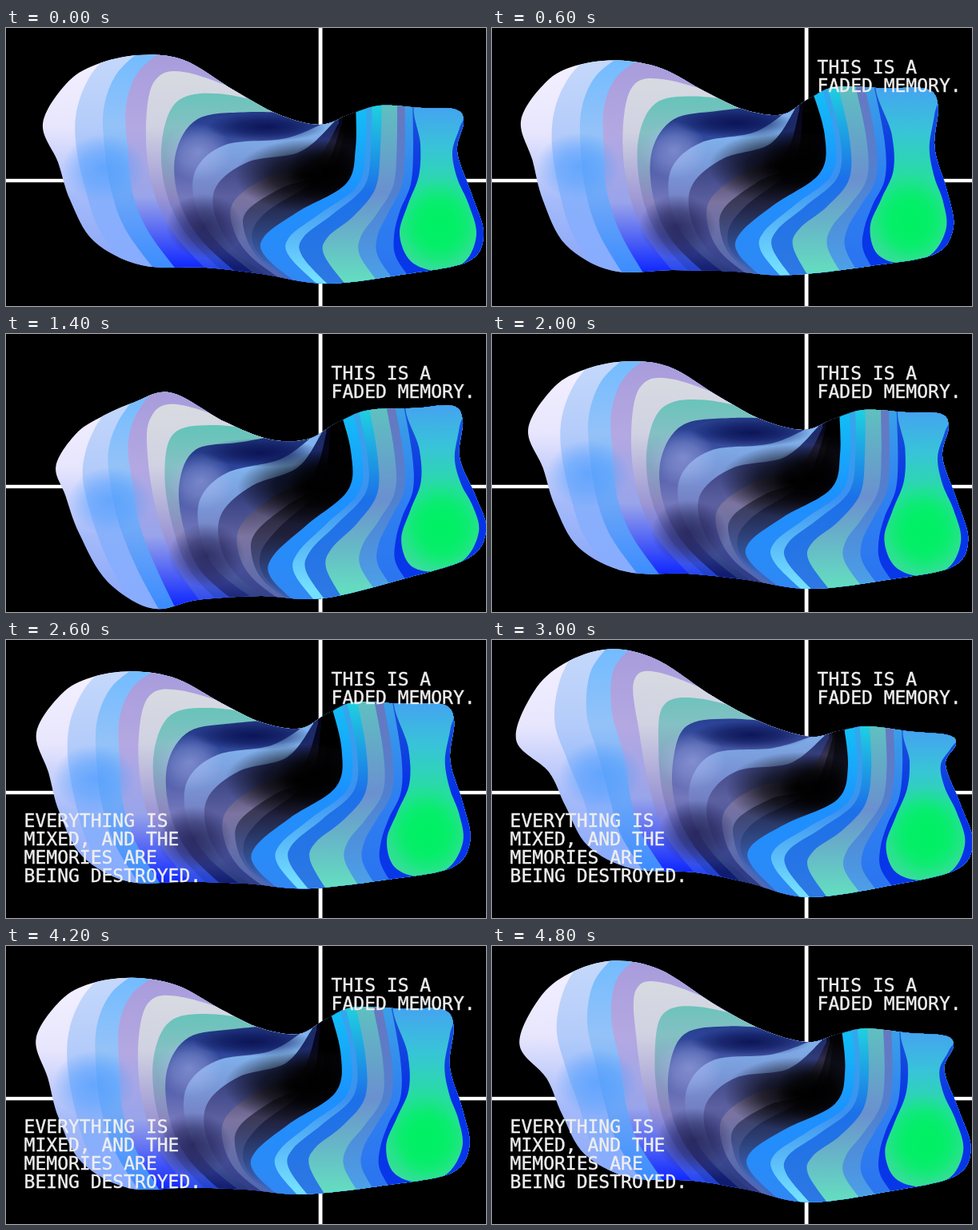
Recreate the animation shown at these times as an HTML page with a canvas. Size 600 by 348 pixels, loop 5 s.

```html
<!DOCTYPE html>
<html lang="en">
<head>
<meta charset="utf-8">
<title>Faded memory</title>
<style>
  html, body { margin: 0; width: 600px; height: 348px; overflow: hidden; background: #000; }
  canvas, svg { position: absolute; left: 0; top: 0; display: block; }
  text {
    font: 23px "DejaVu Sans Mono", "Noto Sans Mono", monospace;
    fill: #eee; stroke: #eee; stroke-width: .4px; white-space: pre;
  }
</style>
</head>
<body>
<canvas id="stage" width="600" height="348"></canvas>
<svg width="600" height="348" viewBox="0 0 600 348">
  <g id="first">
    <text x="406.6" y="57">THIS IS A</text>
    <text x="406.6" y="80">FADED MEMORY.</text>
  </g>
  <g id="second">
    <text x="22.6" y="234">EVERYTHING IS</text>
    <text x="22.6" y="257">MIXED, AND THE</text>
    <text x="22.6" y="280">MEMORIES ARE</text>
    <text x="22.6" y="303">BEING DESTROYED.</text>
  </g>
</svg>
<script>
const ctx = document.getElementById('stage').getContext('2d');
const first = document.getElementById('first');
const second = document.getElementById('second');
const STEP = 200, LOOP = 5000, CYCLE = 9.5;

const points = s => s.trim().split(/\s+/).map(p => p.split(',').map(Number));
const lerp = (a, b, k) => a + (b - a) * k;

// Resting shape, clockwise from the left tip.
const outline = points(`46,120 75,70 112,46 165,34 222,40 285,78 340,108 392,121 430,108 468,97
  520,100 562,102 572,118 564,155 582,208 597,258 578,292 500,308 400,320 320,308 250,300
  170,297 110,267 80,215 65,168`);
const drop = points(`513,92 518,145 516,185 502,222 492,258 506,292 540,304 574,292 588,258
  578,220 564,188 558,155 567,125 577,92`);

// Main seams between the bands, top to bottom.
const seams = [
  '132,28 104,62 88,105 88,150 100,205 118,255 160,312',
  '205,22 166,54 150,98 152,150 158,205 178,255 222,314',
  '330,94 228,56 186,66 175,125 182,195 208,255 262,314',
  '404,116 350,138 275,146 237,178 238,225 268,272 330,322',
  '420,120 395,180 345,200 302,228 298,255 318,290 372,328',
  '437,90 437,150 425,195 365,230 322,262 326,288 378,330',
  '470,86 468,150 462,200 435,235 402,262 398,285 430,328',
  '508,88 509,150 506,195 492,230 485,260 488,288 512,322'
].map(points);

// Handles: place at rest, then the pull towards the wide, low and tall poses.
const handles = [
  '46,120 -10,-5 17,45 -16,5',
  '150,36 -8,5 -2,57 -20,-23',
  '222,40 -10,11 -15,34 -17,-16',
  '300,86 -20,0 -10,32 -10,-8',
  '400,120 -32,-14 -16,9 5,1',
  '468,97 -40,-24 -16,-2 2,11',
  '566,104 -18,-26 -4,-13 9,17',
  '564,155 -11,-5 3,0 3,1',
  '597,258 -21,-8 3,-13 4,-5',
  '400,320 -30,-11 -5,11 -5,2',
  '250,300 -25,3 -10,33 5,-9',
  '170,297 -20,7 13,47 5,-11',
  '65,168 -15,-3 9,34 6,-3',
  '207,128 -12,-2 1,32 11,-5',
  '437,150 -22,-18 -6,-2 8,8',
  '325,258 -12,-5 13,15 2,-4'
].map(points);

const basis = (x, y) => [
  ...handles.map(([[hx, hy]]) => {
    const r = ((x - hx) ** 2 + (y - hy) ** 2) / 1e4;
    return r ? r * Math.log(r) : 0;
  }), 1, x / 100, y / 100];

function solve(rows) {
  const n = rows.length;
  for (let c = 0; c < n; c++) {
    let p = c;
    for (let r = c; r < n; r++) if (Math.abs(rows[r][c]) > Math.abs(rows[p][c])) p = r;
    [rows[c], rows[p]] = [rows[p], rows[c]];
    for (let r = 0; r < n; r++) {
      if (r === c) continue;
      const f = rows[r][c] / rows[c][c];
      for (let k = c; k <= n; k++) rows[r][k] -= f * rows[c][k];
    }
  }
  return rows.map((row, i) => row[n] / row[i]);
}

// Thin-plate coefficients of one pose along one axis.
function fit(pose, axis) {
  const rows = handles.map(h => [...basis(...h[0]), h[pose][axis]]);
  for (const side of [() => 1, h => h[0][0] / 100, h => h[0][1] / 100])
    rows.push([...handles.map(side), 0, 0, 0, 0]);
  return solve(rows);
}
const poses = [1, 2, 3].map(p => [fit(p, 0), fit(p, 1)]);

function makeWarp(weights) {
  const [cx, cy] = [0, 1].map(axis => poses[0][axis].map((_, i) =>
    weights.reduce((sum, w, p) => sum + w * poses[p][axis][i], 0)));
  return ([x, y]) => {
    const b = basis(x, y);
    const pull = c => b.reduce((sum, v, i) => sum + v * c[i], 0);
    return [x + pull(cx), y + pull(cy)];
  };
}

// The shape swells wide, tall, low, tall in every cycle.
const bump = (t, mid, reach) =>
  Math.abs(t - mid) < reach ? Math.cos((t - mid) / reach * Math.PI / 2) ** 2 : 0;
function weightsAt(step) {
  const t = step % CYCLE;
  return [bump(t, 2.7, 2.7), bump(t, 7, 1.5), bump(t, 5.6, 1.6) + bump(t, 8.6, 1.6)];
}

function band(pos, colors) {
  const i = Math.min(Math.floor(pos), seams.length - 2);
  const line = seams[i].map((p, n) => p.map((v, a) => lerp(v, seams[i + 1][n][a], pos - i)));
  return { line, colors: colors.split(' ') };
}
const leftBands = [
  band(0, 'c4d8fb b4ccfa 88b0fb 88acff'),
  band(.55, '74bcff 94c2f8 6ca6f8 3c8cff'),
  band(1, 'a89cdc b4a8e2 98a4ea 1028ff'),
  band(2, 'd9dde0 d0d2e2 9c96d4 2848f0'),
  band(2.32, '4cc8b0 84c0c4 8c86c0 2040d0'),
  band(2.6, '0c1850 2c4498 7478bc 101c70'),
  band(3, '7fb4f0 80b4ee 7480c4 28387c'),
  band(3.4, '1c2a68 1c2a68 5c60a0 303c88'),
  band(3.75, '000010 080820 7c74a0 5068b0'),
  band(4, '000000 000000 3c3a58 4868c0'),
  band(4.4, '000000 000000 20203c 3c68c0')
];
const rightBands = [
  band(5, '12c0f6 1c90ff 2f88f4'),
  band(5.4, '34a8ec 3c90f0 74e0ff'),
  band(5.62, '1fd0e0 1c70e8 2c78e4'),
  band(6, '5fc0c0 6a90d0 64dcc0'),
  band(6.5, '6878c0 5080d0 4ca0e8'),
  band(6.75, '3aa0e8 2f80f0 2a74f0'),
  band(7, '1b56d8 0630e8 0838e8')
];

function spline(pts, closed) {
  const n = pts.length;
  const at = i => closed ? pts[(i + n) % n] : pts[Math.max(0, Math.min(n - 1, i))];
  ctx.beginPath();
  ctx.moveTo(...pts[0]);
  for (let i = 0; i < (closed ? n : n - 1); i++) {
    const [a, b, c, d] = [at(i - 1), at(i), at(i + 1), at(i + 2)];
    ctx.bezierCurveTo(b[0] + (c[0] - a[0]) / 6, b[1] + (c[1] - a[1]) / 6,
      c[0] - (d[0] - b[0]) / 6, c[1] - (d[1] - b[1]) / 6, c[0], c[1]);
  }
}

function shade([, top], [, bottom], colors) {
  const g = ctx.createLinearGradient(0, top, 0, bottom);
  colors.forEach((c, i) => g.addColorStop(i / (colors.length - 1), '#' + c));
  return g;
}

function glow([x, y], rx, ry, rgb, alpha) {
  const g = ctx.createRadialGradient(0, 0, 0, 0, 0, 1);
  g.addColorStop(0, `rgba(${rgb},${alpha})`);
  g.addColorStop(.5, `rgba(${rgb},${alpha * .65})`);
  g.addColorStop(1, `rgba(${rgb},0)`);
  ctx.save();
  ctx.translate(x, y);
  ctx.scale(rx, ry);
  ctx.fillStyle = g;
  ctx.fillRect(-1, -1, 2, 2);
  ctx.restore();
}

function paintBands(bands, warp, from, to) {
  for (const { line, colors } of bands) {
    const path = line.map(warp);
    spline(path);
    ctx.lineTo(700, 420);
    ctx.lineTo(700, -60);
    ctx.lineTo(path[0][0], -60);
    ctx.fillStyle = shade(from, to, colors);
    ctx.fill();
  }
}

function draw(step) {
  const warp = makeWarp(weightsAt(step));

  ctx.fillStyle = '#000';
  ctx.fillRect(0, 0, 600, 348);
  ctx.fillStyle = '#fff';
  ctx.fillRect(390.7, 0, 4.8, 348);
  ctx.fillRect(0, 188.8, 600, 4.4);

  ctx.save();
  spline(outline.map(warp), true);
  ctx.clip();
  const top = warp([190, 35]), bottom = warp([215, 300]);
  ctx.fillStyle = shade(top, bottom, ['f3f0ff', 'e8e6fd', 'a4bafa', '88a6f9']);
  ctx.fillRect(0, 0, 600, 348);
  paintBands(leftBands, warp, top, bottom);
  glow(warp([122, 175]), 52, 42, '76,156,255', .7);
  glow(warp([240, 155]), 42, 36, '180,190,245', .5);
  glow(warp([248, 248]), 48, 40, '28,24,70', .7);
  glow(warp([325, 124]), 75, 18, '8,16,80', .9);
  glow(warp([378, 185]), 92, 46, '0,0,0', 1);
  glow(warp([400, 180]), 48, 40, '0,0,0', 1);

  paintBands(rightBands, warp, warp([470, 97]), warp([450, 315]));

  spline(drop.map(warp), true);
  ctx.clip();
  ctx.fillStyle = shade(warp([540, 100]), warp([540, 303]),
    ['44a4f0', '38c4d8', '28dca4', '2ce090', '3cdca0']);
  ctx.fillRect(400, 0, 200, 348);
  glow(warp([541, 248]), 54, 62, '0,240,100', 1);
  glow(warp([541, 248]), 44, 48, '0,240,100', 1);
  ctx.restore();
}

let shown = -1;
function tick() {
  const t = performance.now() % LOOP;
  const step = Math.floor(t / STEP);
  if (step !== shown) {
    shown = step;
    draw(step);
    first.style.visibility = t >= 400 ? 'visible' : 'hidden';
    second.style.visibility = t >= 2400 ? 'visible' : 'hidden';
  }
  requestAnimationFrame(tick);
}
tick();
</script>
</body>
</html>
```
